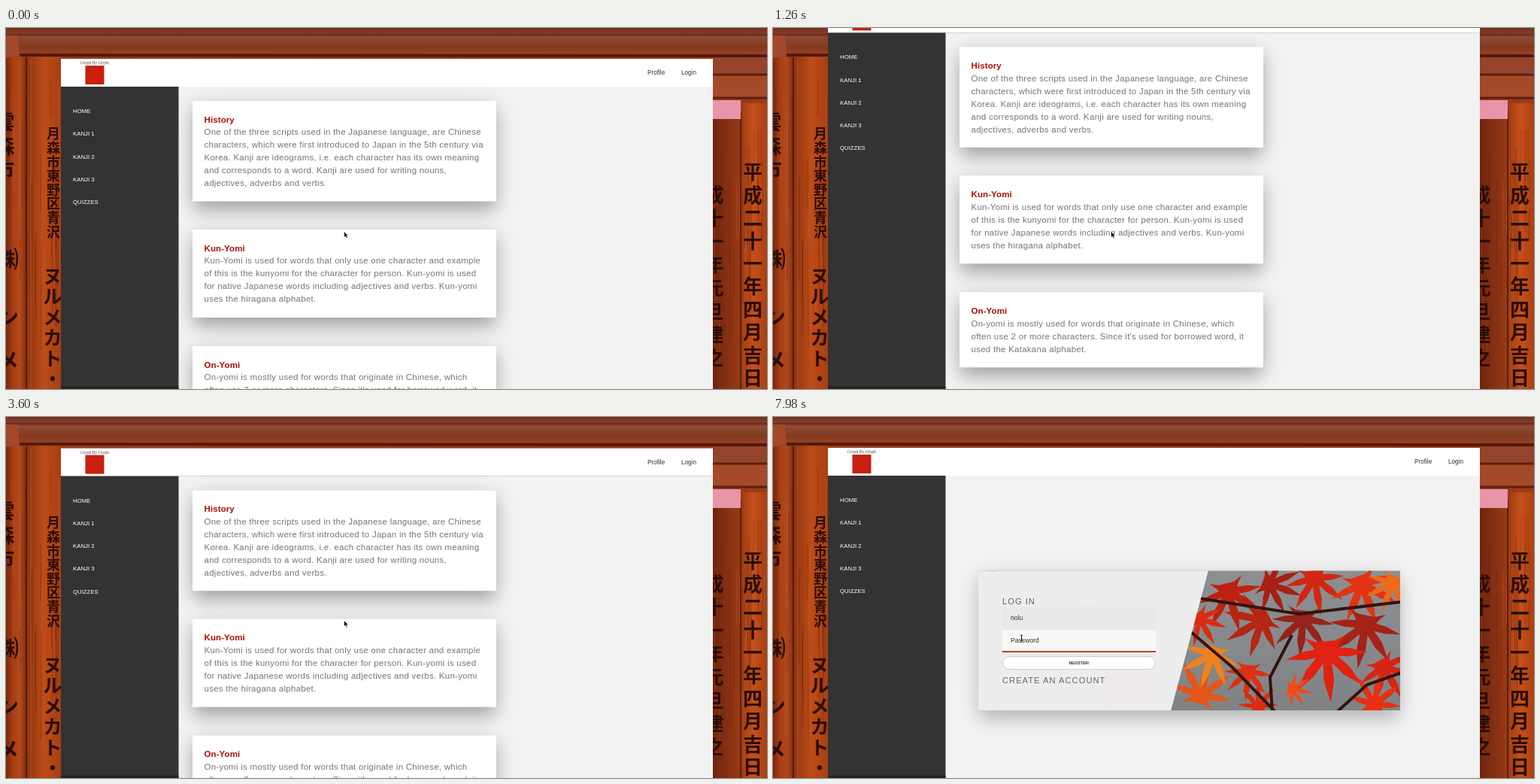
Recreate the animation shown at these times as an HTML page. Size 1012 px wide and 480 px high, loop 8000 ms.

```html
<!DOCTYPE html>
<html lang="en">
<head>
<meta charset="utf-8">
<title>Kanji study site</title>
<style>
  html, body { margin: 0; width: 100%; height: 100%; overflow: hidden; }
  svg { display: block; width: 100vw; height: 100vh; font-family: "Liberation Sans", Arial, sans-serif; }
  text { white-space: pre; }
  .brush { font-family: "Noto Sans CJK JP", "Noto Sans CJK", sans-serif; font-weight: 700; text-anchor: middle; fill: #2b0d06; }
  .menu { font-size: 7.8px; fill: #fff; }
  .nav { font-size: 8.2px; fill: #333; }
  .title { font-size: 11.5px; font-weight: 700; letter-spacing: .1px; fill: #a80f06; }
  .copy { font-size: 11.5px; letter-spacing: .26px; fill: #757575; }
  .form { font-size: 11.2px; letter-spacing: 1px; fill: #666; }
  .field { font-size: 8.65px; fill: #333; }
</style>
</head>
<body>
<svg id="stage" viewBox="0 0 1012 480" preserveAspectRatio="none"></svg>
<script>
const LOOP = 8000;
const LOGIN_AT = 5000, USER_FOCUS = 6900, PASS_FOCUS = 7560;
const USER = "nolu";

const rect = (x, y, w, h, fill, extra = "") =>
  `<rect x="${x}" y="${y}" width="${w}" height="${h}" fill="${fill}" ${extra}/>`;
const label = (cls, x, y, str, extra = "") => `<text class="${cls}" x="${x}" y="${y}" ${extra}>${str}</text>`;
const poly = (points, fill, extra = "") => `<polygon points="${points}" fill="${fill}" ${extra}/>`;
const line = (d, color, width, extra = "") =>
  `<path d="${d}" fill="none" stroke="${color}" stroke-width="${width}" ${extra}/>`;
const column = (str, x, y, step, size) =>
  [...str].map((c, i) => label("brush", x, y + i * step + size * .36, c, `font-size="${size}"`)).join("");

function random(seed) {
  return () => (seed = (seed * 16807) % 2147483647) / 2147483647;
}

function grain(x, y, w, h, count, seed) {
  const rnd = random(seed);
  let out = "";
  for (let i = 0; i < count; i++) {
    const gx = x + rnd() * w, gy = y + rnd() * h * .7;
    out += line(`M${gx.toFixed(1)} ${gy.toFixed(1)}v${(h * (.1 + rnd() * .3)).toFixed(1)}`,
      rnd() < .5 ? "#5e1c08" : "#d9652a", 1.2, 'opacity=".28"');
  }
  return out;
}

function gradient(id, vertical, ...colors) {
  const stops = colors.map((c, i) => `<stop offset="${i / (colors.length - 1)}" stop-color="${c}"/>`).join("");
  return `<linearGradient id="${id}" x2="${vertical ? 0 : 1}" y2="${vertical ? 1 : 0}">${stops}</linearGradient>`;
}

const defs = `<defs>
  ${gradient("beam", true, "#74301d", "#8d4a35", "#84391f", "#9a4425")}
  ${gradient("postA", false, "#7a270c", "#a83f14", "#b2481a", "#7c2b10")}
  ${gradient("postB", false, "#8e3512", "#bd4c18", "#a63e13")}
  ${gradient("postC", false, "#99380f", "#c4501b", "#ab4012")}
  ${gradient("postD", false, "#6f250f", "#9a3a15")}
  ${gradient("fade", true, "#8d9092", "#808385")}
  <filter id="soft" x="-30%" y="-60%" width="160%" height="220%"><feGaussianBlur stdDeviation="11"/></filter>
  <filter id="wide" x="-30%" y="-60%" width="160%" height="220%"><feGaussianBlur stdDeviation="18"/></filter>
  <clipPath id="panel"><rect x="273" y="204.500" width="561" height="185.500"/></clipPath>
</defs>`;

function shadow(x, y, w, h, strength) {
  return rect(x, y + 5, w, h, "#000", `filter="url(#wide)" opacity="${strength * .35}"`) +
    rect(x + 2, y + 11, w - 4, h, "#000", `filter="url(#soft)" opacity="${strength}"`);
}

const shrine =
  rect(0, 0, 1012, 480, "#9a3b16") +
  rect(0, 36, 28, 444, "url(#postA)") + rect(28, 36, 46, 444, "url(#postB)") +
  grain(0, 60, 73, 420, 38, 71) +
  line("M27 40V480", "#571a0b", 2) + line("M33 40V480", "#d1602a", 1, 'opacity=".5"') +
  rect(940, 120, 37, 360, "url(#postD)") + rect(976, 100, 36, 380, "url(#postC)") +
  grain(942, 120, 70, 360, 32, 193) +
  line("M977 110V480", "#58200f", 2) +
  rect(940, 36, 72, 26, "#93442b") + rect(940, 60, 72, 34, "#a44a29") +
  line("M940 62H1012M940 93H1012", "#5b2010", 3) +
  rect(940, 96, 37, 25, "#e895a9") +
  rect(0, 0, 1012, 38, "url(#beam)") +
  line("M0 9H1012", "#692713", 3, 'opacity=".7"') +
  line("M18 36L1012 37", "#54190c", 4) +
  poly("0,10 16,10 18,36 0,40", "#a2492b") +
  column("雲森市", -2, 125, 32, 27) + column("㈱", 2, 307, 30, 30) + column("ンメ", 3, 385, 58, 28) +
  column("月森市東野区青沢", 63, 141, 18.6, 18) +
  column("ヌルメカト・", 62, 330, 27.4, 25) +
  column("成十一年元旦建之", 942, 222, 31, 25) +
  column("平成二十一年四月吉日", 993, 192, 30.4, 26);

const cards = [
  [97, 133.5, "History", [
    "One of the three scripts used in the Japanese language, are Chinese",
    "characters, which were first introduced to Japan in the 5th century via",
    "Korea. Kanji are ideograms, i.e. each character has its own meaning",
    "and corresponds to a word. Kanji are used for writing nouns,",
    "adjectives, adverbs and verbs."]],
  [268, 117, "Kun-Yomi", [
    "Kun-Yomi is used for words that only use one character and example",
    "of this is the kunyomi for the character for person. Kun-yomi is used",
    "for native Japanese words including adjectives and verbs. Kun-yomi",
    "uses the hiragana alphabet."]],
  [423, 100, "On-Yomi", [
    "On-yomi is mostly used for words that originate in Chinese, which",
    "often use 2 or more characters. Since it's used for borrowed word, it",
    "used the Katakana alphabet."]]
];

const home = cards.map(([y, h]) => shadow(248, y, 404, h, .27)).join("") +
  cards.map(([y, h, title, lines]) =>
    rect(248, y, 404, h, "#fff") + label("title", 263.5, y + 28.6, title) +
    lines.map((s, i) => label("copy", 263.5, y + 45.4 + i * 17, s)).join("")).join("");

function leaf(x, y, r, dir, fill) {
  const reach = [.5, .8, .95, 1, .95, .8, .5], points = [];
  const put = (dist, deg) => {
    const a = (dir + deg) * Math.PI / 180;
    points.push(`${(x + dist * r * Math.cos(a)).toFixed(1)},${(y + dist * r * Math.sin(a)).toFixed(1)}`);
  };
  reach.forEach((len, i) => {
    const deg = (i - 3) * 42;
    put(.24, deg - 21);
    put(len * .58, deg - 10);
    put(len, deg);
    put(len * .58, deg + 10);
  });
  return poly(points.join(" "), fill);
}

const foliage =
  rect(273, 204, 561, 187, "url(#fade)") +
  leaf(470, 345, 58, 85, "#dc3412") + leaf(400, 275, 52, 30, "#c33b19") +
  leaf(568, 370, 52, -75, "#e4551a") + leaf(585, 315, 48, 110, "#f0821e") +
  leaf(632, 338, 40, 95, "#df2f12") + leaf(606, 232, 55, 75, "#bd2211") +
  leaf(567, 268, 40, 60, "#dc2c10") + leaf(660, 222, 46, 20, "#a62015") +
  leaf(720, 214, 50, 80, "#d22712") + leaf(783, 222, 56, 70, "#e23313") +
  leaf(824, 220, 42, 110, "#ec6a19") + leaf(650, 270, 54, 150, "#b52613") +
  leaf(705, 268, 52, 95, "#96231a") + leaf(788, 276, 60, 100, "#a42218") +
  leaf(736, 312, 68, 85, "#e02212") + leaf(812, 332, 48, 60, "#d82412") +
  leaf(690, 362, 28, 10, "#ef4b18") + leaf(800, 382, 45, -80, "#e53013") +
  leaf(645, 385, 34, -90, "#d92c12") +
  line("M556 286L610 332L668 392M664 392L661 346L690 290M750 392L790 356L836 340M560 240L700 262L834 246", "#32140f", 4) +
  line("M290 205L390 245L490 265M440 300L450 390", "#5d3b32", 3);

const login = shadow(273, 204.5, 561, 185.5, .2) +
  `<g clip-path="url(#panel)">${foliage}
    ${poly("273,204 579,204 529,391 273,391", "#f2f1f2", 'opacity=".965"')}</g>` +
  label("form", 305, 249, "LOG IN") +
  rect(305, 253, 204, 30, "#fff", 'id="userBox"') +
  rect(305, 283, 204, 30, "#fff", 'id="passBox"') +
  rect(305, 281, 204, 2, "#b8431b", 'id="userLine"') +
  rect(305, 311, 204, 2, "#b8431b", 'id="passLine"') +
  label("field", 316, 270, "", 'id="userText"') +
  label("field", 316, 300, "Password") +
  rect(305.5, 318.5, 203, 17, "#fff", 'rx="8.5" stroke="#ccc"') +
  label("field", 407, 329, "REGISTER!", 'style="font-size:5px;font-weight:700;text-anchor:middle"') +
  label("form", 305, 354, "CREATE AN ACCOUNT");

const menu = ["HOME", "KANJI 1", "KANJI 2", "KANJI 3", "QUIZZES"]
  .map((s, i) => label("menu", 89, 113 + i * 30.25, s)).join("");

const site =
  rect(73, 78, 867, 560, "#f2f2f2") + rect(73, 41, 867, 37, "#fff") +
  rect(105.5, 50, 25, 25, "#c9200f") +
  label("", 118, 48, "Glyph By Glyph", 'font-size="5.7" text-anchor="middle" fill="#444" font-family="Liberation Serif, serif"') +
  label("nav", 853, 62, "Profile") + label("nav", 898, 62, "Login") +
  `<g id="home">${home}</g><g id="login">${login}</g>` +
  rect(73, 78, 156.5, 560, "#333") + menu;

document.getElementById("stage").innerHTML = defs + shrine +
  `<g id="site">${site}</g>` + rect(73, 476.5, 156.5, 4, "#252525") +
  `<g id="cursor">
    <path id="arrow" d="M0 0V8L1.900 6.300L3.200 9.200L4.600 8.600L3.300 5.800H5.700Z" fill="#111" stroke="#fff" stroke-width=".5"/>
    <path id="beamCursor" d="M-1.500 -4Q0 -4 0 -3Q0 -4 1.500 -4M0 -3V3M-1.500 4Q0 4 0 3Q0 4 1.500 4" fill="none" stroke="#111"/>
  </g>`;

const el = Object.fromEntries([...document.querySelectorAll("[id]")].map(n => [n.id, n]));
const show = (node, on) => node.setAttribute("visibility", on ? "inherit" : "hidden");
const move = (node, x, y) => node.setAttribute("transform", `translate(${x.toFixed(2)} ${y.toFixed(2)})`);

// Monotone cubic through [time, value] keys.
function track(keys) {
  const last = keys.length - 1;
  const rise = i => (keys[i + 1][1] - keys[i][1]) / (keys[i + 1][0] - keys[i][0]);
  const slopes = keys.map((_, i) => {
    if (i === 0 || i === last) return 0;
    const a = rise(i - 1), b = rise(i);
    return a * b <= 0 ? 0 : 2 * a * b / (a + b);
  });
  return t => {
    if (t <= keys[0][0]) return keys[0][1];
    if (t >= keys[last][0]) return keys[last][1];
    const i = keys.findIndex(k => k[0] > t) - 1;
    const [t0, v0] = keys[i], [t1, v1] = keys[i + 1], d = t1 - t0, u = (t - t0) / d;
    const s = u * u * (3 - 2 * u);
    return v0 + (v1 - v0) * s + d * u * (1 - u) * (slopes[i] * (1 - u) - slopes[i + 1] * u);
  };
}

const scroll = track([[0, 0], [180, 6], [540, 42], [900, 66], [1260, 71.7], [2700, 71.7],
  [2880, 69.7], [3120, 40], [3360, 5], [3480, -1.3], [3600, -.6], [3840, 0]]);
const cursorX = track([[3720, 449.5], [4700, 908], [5250, 908], [6300, 340.5], [7250, 340.5], [7520, 330.5]]);
const cursorY = track([[3720, 270.5], [4700, 59], [5250, 59], [6300, 271.5], [7250, 271.5], [7520, 294]]);

function render(t) {
  const onLogin = t >= LOGIN_AT, x = cursorX(t), y = cursorY(t);
  move(el.site, 0, -scroll(t));
  show(el.home, !onLogin);
  show(el.login, onLogin);

  const userFocus = t >= USER_FOCUS && t < PASS_FOCUS, passFocus = t >= PASS_FOCUS;
  const typed = Math.max(0, Math.min(USER.length, Math.floor((t - 6960) / 90)));
  el.userText.textContent = typed ? USER.slice(0, typed) : "Username";
  el.userBox.setAttribute("fill", passFocus ? "#e9e9e9" : "#fff");
  el.userBox.setAttribute("opacity", passFocus ? .9 : userFocus ? .65 : .25);
  el.passBox.setAttribute("opacity", passFocus ? .65 : .25);
  show(el.userLine, onLogin && userFocus);
  show(el.passLine, onLogin && passFocus);

  const overField = onLogin && x > 305 && x < 509 && y > 253 && y < 313;
  move(el.cursor, x, y);
  show(el.arrow, !overField);
  show(el.beamCursor, overField);
}

function tick() {
  render(performance.now() % LOOP);
  requestAnimationFrame(tick);
}
tick();
</script>
</body>
</html>
```
